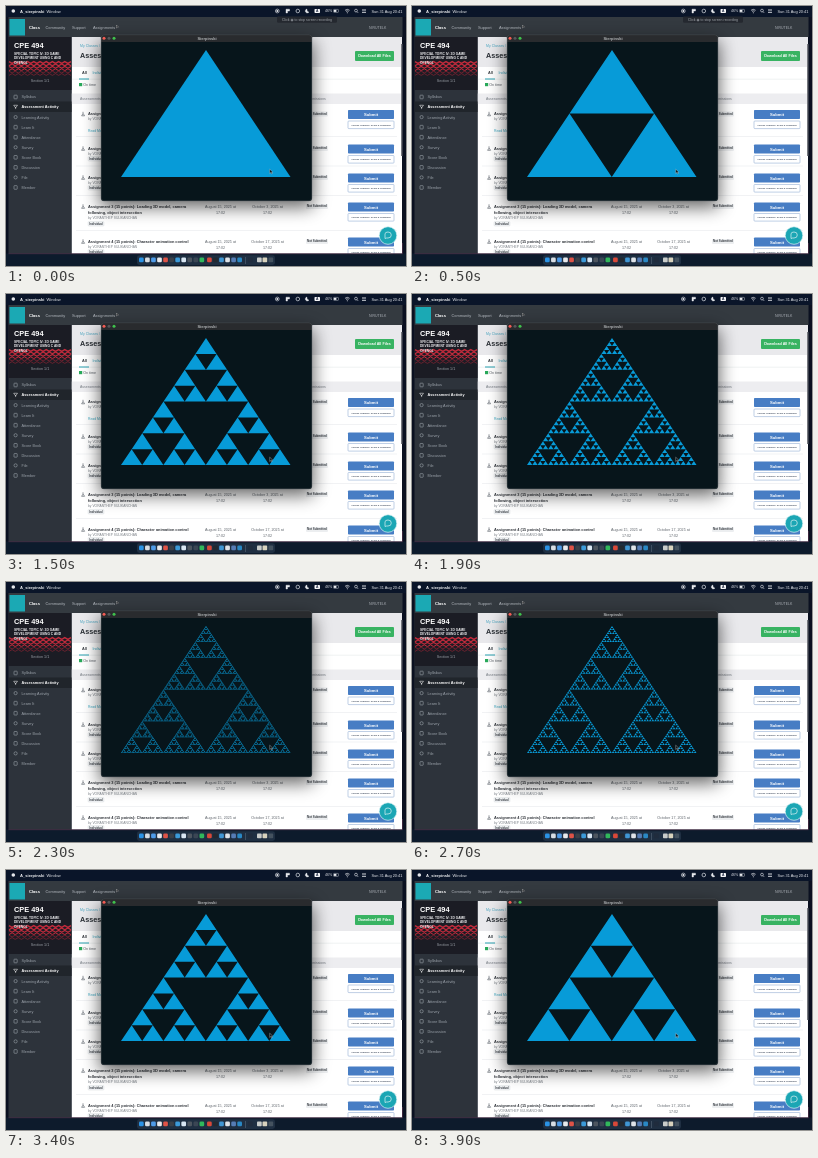
These frames come from a looping animation (400 px wide and 260 px high, 4 s). An HTML page:

```html
<!DOCTYPE html>
<html lang="en">
<head>
<meta charset="utf-8">
<title>Sierpinski</title>
<style>
html, body { margin: 0; width: 100%; height: 100%; overflow: hidden; background: #0a1020; }
svg { display: block; width: 400px; height: 260px; font-family: "Liberation Sans", Arial, sans-serif; }
.shadow { filter: blur(9px); }
</style>
</head>
<body>
<svg id="stage" viewBox="0 0 400 260" xmlns="http://www.w3.org/2000/svg"></svg>
<script>
const NS = "http://www.w3.org/2000/svg";
const stage = document.getElementById("stage");

function add(tag, attrs, content) {
  const el = document.createElementNS(NS, tag);
  for (const key in attrs) el.setAttribute(key, attrs[key]);
  if (content) el.textContent = content;
  return stage.appendChild(el);
}
const rect = (x, y, width, height, fill, more) => add("rect", { x, y, width, height, fill, ...more });
const dot = (cx, cy, r, fill, more) => add("circle", { cx, cy, r, fill, ...more });
const line = (d, stroke, width = 0.6, fill = "none") => add("path", { d, stroke, fill, "stroke-width": width });
const label = (x, y, text, size, fill, more) => add("text", { x, y, "font-size": size, fill, ...more }, text);
const BOLD = { "font-weight": 700 };
const MID = { "text-anchor": "middle" };
const BOLD_MID = { ...BOLD, ...MID };

function menuBar() {
  rect(0, 0, 400, 11, "#0a1529");
  dot(7.3, 5, 1.8, "#e4e6ea");
  label(14, 6.5, "A_sierpinski", 4.1, "#f2f3f5", BOLD);
  label(40.5, 6.5, "Window", 4, "#e6e8ec");
  dot(271.3, 5, 1.9, "none", { stroke: "#e8eaee", "stroke-width": 0.6 });
  dot(271.3, 5, 1, "#e8eaee");
  line("M280 3.2H283.5V5H281.5V7H280Z", "#e8eaee", 0.4, "#e8eaee");
  dot(291.8, 5, 1.8, "none", { stroke: "#dfe2e8", "stroke-width": 0.7 });
  line("M301 3A2 2 0 1 0 303 6A2.3 2.3 0 0 1 301 3", "#e8eaee", 0.3, "#e8eaee");
  rect(308.5, 3, 5.5, 4, "#f5f5f7", { rx: 0.7 });
  label(311.2, 6.3, "A", 3.4, "#15203a", BOLD_MID);
  label(319, 6.4, "46%", 3.6, "#dfe2e8");
  rect(327.5, 3.4, 5, 3, "none", { rx: 0.7, stroke: "#e8eaee", "stroke-width": 0.4 });
  rect(328, 3.9, 2.4, 2, "#e8eaee");
  line("M339 4.3Q341.3 2.4 343.6 4.3M340 5.4Q341.3 4.3 342.6 5.4", "#e8eaee", 0.7);
  dot(341.3, 6.7, 0.5, "#e8eaee");
  dot(350, 4.6, 1.4, "none", { stroke: "#e8eaee", "stroke-width": 0.6 });
  line("M351 5.6L352.2 6.9", "#e8eaee");
  line("M356 4H360M356 6.3H360", "#e8eaee", 0.9);
  label(365.5, 6.5, "Sun 31 Aug 20:41", 3.9, "#eceef2");
}

function navBar() {
  rect(2.5, 11, 394, 20, "#343a40");
  rect(3.5, 13, 15.5, 16.5, "#1ba9b4");
  label(23, 22.8, "Class", 4.1, "#ffffff", BOLD);
  [[39.5, "Community"], [66, "Support"], [87, "Assignments"]].forEach(([x, t]) => label(x, 22.8, t, 3.9, "#b5bac0"));
  line("M110.5 19L110.5 22L111.3 21.3L112.5 21.1Z", "#fff", 0.3, "#111");
  label(363, 22.7, "NIRUTELK", 3.5, "#a9aeb4");
}

function sideBar() {
  rect(2.5, 31, 63, 217, "#2d333b");
  rect(2.5, 31, 63, 53, "#1b1c24");
  // Red zigzag bands that thin out towards the bottom
  for (let row = 0; row < 6; row++) {
    const y = 56.5 + row * 2.4, flip = row % 2 ? -1 : 1;
    let d = "";
    for (let i = 0; i <= 20; i++) d += `${i ? "L" : "M"}${3 + i * 3.1} ${y + (i % 2 ? 0.9 : -0.9) * flip}`;
    line(d, row < 4 ? "#c22b3c" : "#7a2230", 1.3 - row * 0.1);
  }
  label(8, 42, "CPE 494", 7.4, "#ffffff", BOLD);
  ["SPECIAL TOPIC IV: 3D GAME", "DEVELOPMENT USING C AND", "OPENGL"]
    .forEach((t, i) => label(8, 49.2 + i * 4.2, t, 3.25, "#f0f0f2", BOLD));
  label(34, 75.8, "Section 1/1", 3.7, "#9ba1a8", MID);
  rect(2.5, 95.5, 63, 10.5, "#20252b");
  ["Syllabus", "Assessment Activity", "Learning Activity", "Learn It", "Attendance",
   "Survey", "Score Book", "Discussion", "File", "Member"].forEach((t, i) => {
    const y = 91 + i * 10.05, on = i === 1, tint = on ? "#fff" : "#9da4ac";
    if (on) line(`M7.7 ${y - 1.8}H11.5L9.6 ${y + 0.8}ZM9.6 ${y}V${y + 2}`, tint, 0.5);
    else if (i % 3 === 2) dot(9.6, y, 1.6, "none", { stroke: tint, "stroke-width": 0.6 });
    else rect(8, y - 1.8, 3.2, 3.6, "none", { rx: 0.5, stroke: tint, "stroke-width": 0.6 });
    label(15.5, y + 1.4, t, 3.8, tint, on ? BOLD : {});
  });
}

function assignment(y, title, due, sub) {
  const last = title.length - 1, tail = y + 5.3 + last * 6;
  title.forEach((t, i) => label(82, y + 1 + i * 6, t, 3.9, "#30343a", BOLD));
  line(`M77 ${y - 2.2}V${y - 0.4}L75.6 ${y + 1.8}H78.6L77.2 ${y - 0.4}`, "#666c74", 0.7);
  label(82, tail + 1, "by VORANTHEP SULIKANCHAN", 3.3, "#7b8087");
  if (sub === "more") label(82, y + 17.5, "Read More", 3.4, "#38a6c0");
  else {
    const py = last ? y + 15 : y + 8;
    rect(82, py, 16, 4.6, "#f1f3f5", { rx: 1, stroke: "#d5d8dc", "stroke-width": 0.4 });
    label(90, py + 3.3, "Individual", 2.9, "#3c4147", BOLD_MID);
  }
  ["August 15, 2025 at", due + " at"].forEach((t, i) => {
    const x = 214.5 + i * 47;
    label(x, y + 1, t, 3.7, "#5f656c", MID);
    label(x, y + 7, "17:02", 3.7, "#5f656c", MID);
  });
  rect(300, y - 2.5, 22, 5, "#eceef0", { rx: 1 });
  label(311, y + 0.9, "Not Submitted", 2.9, "#33383e", BOLD_MID);
  rect(342, y - 4, 46, 9, "#477dc4", { rx: 0.8 });
  label(365, y + 2, "Submit", 4.2, "#ffffff", BOLD_MID);
  rect(342, y + 7, 46, 7.6, "#ffffff", { rx: 0.8, stroke: "#7f9fcb", "stroke-width": 0.5 });
  label(365, y + 11.7, "Assess Yourself / Score & Feedback", 2.3, "#3f4a5c", BOLD_MID);
}

function page() {
  rect(65.5, 31, 330.5, 217, "#ffffff");
  rect(65.5, 31, 330.5, 30, "#e9e9ec");
  label(74, 41.3, "My Classes /", 3.5, "#4ba5c0");
  label(74, 52.3, "Assessment Activity", 7.2, "#2a2f35", BOLD);
  rect(349, 45, 39, 10, "#38b362", { rx: 1 });
  label(368.5, 51.4, "Download All Files", 3.7, "#ffffff", BOLD_MID);
  line("M65.5 73.2H396", "#dfe2e5", 0.5);
  label(76, 68, "All", 3.8, "#30343a", BOLD);
  label(86.5, 68, "Individual", 3.7, "#38a6c0");
  line("M73 73H83", "#2ba2b2", 1);
  rect(73, 77, 3.2, 3.2, "#29a95a");
  label(77.3, 80, "On time", 3.6, "#50565d");
  rect(65.5, 87.5, 330.5, 10.5, "#ededf0");
  label(74, 94.2, "Assessments", 3.5, "#747a81");
  label(300, 94.2, "Submissions", 3.5, "#747a81");
  [130.5, 160, 189.5, 224.5].forEach(y => line(`M70 ${y}H391`, "#e3e5e8", 0.5));
  assignment(108, ["Assignment 0 (5 points): Window"], "August 24, 2025", "more");
  assignment(142.5, ["Assignment 1 (10 points): Fractals"], "September 5, 2025");
  assignment(171.5, ["Assignment 2 (15 points): Lighting"], "September 19, 2025");
  assignment(200.5, ["Assignment 3 (15 points): Loading 3D model, camera", "following, object intersection"], "October 3, 2025");
  assignment(235.5, ["Assignment 4 (15 points): Character animation control"], "October 17, 2025");
  rect(395, 38, 1.4, 112, "#77797f");
  dot(382, 229.5, 8.8, "#1ba6b4", { stroke: "#d9f1f3", "stroke-width": 0.7 });
  line("M379 232.5V228Q379 226 382 226Q385.3 226 385.3 229Q385.3 232 382 232H380.5Z", "#fff", 0.6);
}

function dock() {
  rect(0, 247.5, 400, 12.5, "#0d1b2c");
  line("M2.5 247.7H396.5V237", "#5c3550", 0.6);
  rect(131, 249.3, 138, 9.7, "#1f2f42", { rx: 2.4 });
  const tints = ["#2b93e6", "#d8dde3", "#4f9be8", "#e8e9ec", "#de5347", "#3b4048", "#3c9ad9",
    "#d9e6f2", "#4d555f", "#3b4654", "#31b85b", "#d94839", "#232930", "#4096d4", "#dfe3e8", "#567cb5", "#2a88c4"];
  tints.forEach((tint, i) => rect(133 + i * 6.05 + (i > 10 ? 1.5 : 0), 251.5, 4.7, 4.7, tint, { rx: 1.3 }));
  line("M239.5 251V258", "#718094", 0.4);
  [["#202c3d", 242], ["#c9ccca", 251], ["#d8d2bd", 256.5], ["#44525f", 262.5]]
    .forEach(([tint, x]) => rect(x, 251.6, 4.7, 4.7, tint, { rx: 0.8 }));
}

function appWindow() {
  rect(94, 35, 213, 166, "#000", { class: "shadow", opacity: 0.62 });
  rect(95, 28.5, 211, 166.5, "#07151b", { rx: 2.8 });
  line("M95 36V31.3Q95 28.5 97.8 28.5H303.2Q306 28.5 306 31.3V36Z", "none", 0, "#292b2e");
  rect(95.2, 28.7, 210.6, 166.1, "none", { rx: 2.7, stroke: "#555a5e", "stroke-width": 0.5 });
  ["#f25c54", "#55585b", "#3fc24d"].forEach((tint, i) => dot(98 + i * 5, 32.3, 1.5, tint));
  label(201, 33.8, "Sierpinski", 4, "#b4b7b9", BOLD_MID);
}

const mid = (p, q) => [(p[0] + q[0]) / 2, (p[1] + q[1]) / 2];
function sierpinski(a, b, c, depth) {
  if (!depth) return `M${a}L${b}L${c}Z`;
  const ab = mid(a, b), bc = mid(b, c), ca = mid(c, a);
  return sierpinski(a, ab, ca, depth - 1) + sierpinski(ab, b, bc, depth - 1) + sierpinski(ca, bc, c, depth - 1);
}

rect(0, 0, 400, 260, "#0a1020");
page();
sideBar();
navBar();
menuBar();
dock();
appWindow();
const hint = [
  rect(271, 10.6, 60, 6.2, "#24282f", { rx: 1.2 }),
  label(301, 14.8, "Click \u25c9 to stop screen recording", 3.5, "#a3a7ad", MID)
];

// Key presses: each one subdivides once more, or once less after the deepest level
const LOOP = 4000, MAX = 7;
const PRESSES = [400, 800, 1300, 1600, 1850, 2050, 2250, 2700, 3000, 3150, 3300, 3700];
const levels = Array.from({ length: MAX + 1 }, (_, n) => sierpinski([200, 44], [115, 171], [284.5, 171], n));
const fractal = add("path", { fill: "#079bd8" });
line("M263.7 163.2V167.5L264.8 166.5L265.6 168L266.2 167.7L265.5 166.2H266.8Z", "#dfe7eb", 0.35, "#05090c");

let shown = -1;
function draw(now) {
  const t = now % LOOP;
  const n = PRESSES.filter(press => press <= t).length;
  const depth = MAX - Math.abs(MAX - n);
  if (depth !== shown) fractal.setAttribute("d", levels[shown = depth]);
  const fade = Math.min(1, Math.max(0, (1100 - t) / 500));
  hint.forEach(el => el.setAttribute("opacity", fade));
}
const start = performance.now();
function tick() {
  draw(performance.now() - start);
  requestAnimationFrame(tick);
}
tick();
</script>
</body>
</html>
```
